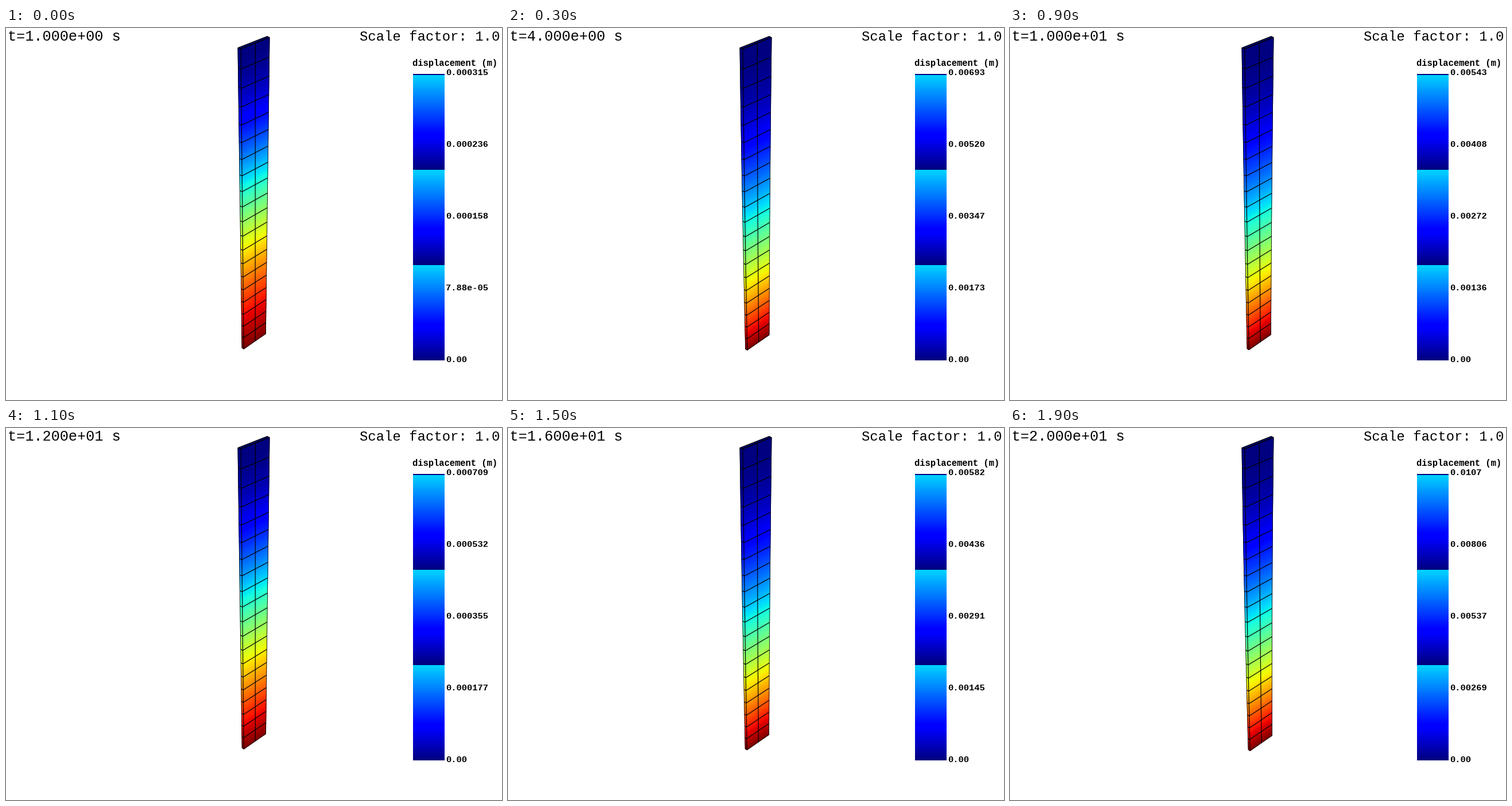
Recreate the animation shown at these times as a matplotlib script. Size 864 by 648 pixels, loop 2 s.

```python
import numpy as np
import matplotlib.pyplot as plt
from matplotlib.animation import FuncAnimation
from matplotlib.collections import LineCollection

W, H, DPI = 864, 648, 100
CELLS, STEPS = 20, 20

# key readings of the peak displacement: time (s), value (mm)
KEYS = np.array([(1, .3151), (4, 6.931), (8, 10.16), (12, .7092),
                 (14, .9856), (16, 5.817), (20, 10.745)]).T

fig = plt.figure(figsize=(W / DPI, H / DPI), dpi=DPI, facecolor="white")
ax = fig.add_axes([0, 0, 1, 1])
ax.axis("off")


def label(x, y, text, px, weight="normal"):
    return ax.text(x, y, text, family="Liberation Mono", weight=weight,
                   size=px * 72 / DPI, color="black", va="baseline")


def bending(s):
    """Cantilever under a uniform load, 1 at the free end."""
    return (6 * s**2 - 4 * s**3 + s**4) / 3


def field(s, peak):
    """Normalised displacement: a stiff early shape fading into bending."""
    early = s - .065 * np.sin(2 * np.pi * s**.8)
    w = 1 / (1 + 1.3 * (peak - KEYS[1, 0]))
    return w * early + (1 - w) * bending(s)


def edge(s, top, bottom, depth, peak):
    """Points down one long edge, in perspective and bent."""
    top, bottom, s = np.array(top), np.array(bottom), s[:, None]
    pts = (top + (bottom * (1 + depth) - top) * s) / (1 + depth * s)
    return pts + bending(s) * np.array([.39, .3]) * peak


def edges(s, peak):
    back = edge(s, (404, 34.5), (411, 557), .362, peak)
    left = edge(s, (409, 36.5), (414, 559), .362, peak)
    right = edge(s, (459, 16.5), (452.2, 532.5), .351, peak)
    k = np.linspace(.506, .524, len(s))[:, None]
    return back, left, left + (right - left) * k, right


# legend bar: the lowest third of the colour map, three times over
frac = (np.arange(499)[::-1] + .5) / 497.5
ax.imshow((frac * 3 % 1 / 3)[:, None], cmap="jet", vmin=0, vmax=1,
          extent=(709, 764, 579, 80), aspect="auto", interpolation="nearest")
ax.set_xlim(0, W)
ax.set_ylim(H, 0)
ax.set_autoscale_on(False)

clock = label(3, 22, "", 25.2)
label(615.5, 22, "Scale factor: 1.0", 23.9)
label(707.5, 66, "displacement (m)", 15.5, "bold")
ticks = [label(766, 82 + 125.1 * i, "", 15.4, "bold") for i in range(5)]

ax.add_patch(plt.Polygon([(404, 34.5), (455, 14.5), (459, 16.5), (409, 36.5)],
                         fc="#00006a", ec="black", lw=.8, zorder=3))
grid = LineCollection([], colors="black", linewidths=.85, zorder=4)
rim = LineCollection([], colors="black", linewidths=.6, zorder=4)
ax.add_collection(grid, autolim=False)
ax.add_collection(rim, autolim=False)

fine = np.linspace(0, 1, CELLS * 10 + 1)
nodes = np.linspace(0, 1, CELLS + 1)
faces = []


def draw(i):
    t = i + 1
    peak = np.interp(t, *KEYS)
    while faces:
        faces.pop().remove()
    back, left, mid, right = edges(fine, peak)
    value = np.repeat(field(fine, peak)[:, None], 2, axis=1)
    for a, b in ((back, left), (left, right)):
        x, y = np.stack([a, b], axis=1).transpose(2, 0, 1)
        faces.append(ax.pcolormesh(x, y, value, cmap="jet", vmin=0, vmax=1,
                                   shading="gouraud", zorder=2))

    rows = list(np.stack(edges(nodes, peak), axis=1))
    grid.set_segments([left, mid] + rows[:-1])
    rim.set_segments([back, right, rows[-1]])

    clock.set_text(f"t={t:.3e} s")
    for k, tick in enumerate(ticks):
        tick.set_text(f"{peak / 1000 * (4 - k) / 4:#.3g}")
    return faces + [grid, rim, clock] + ticks


anim = FuncAnimation(fig, draw, frames=STEPS, interval=100,
                     init_func=lambda: draw(0), repeat=True, repeat_delay=0)
plt.show()
```
